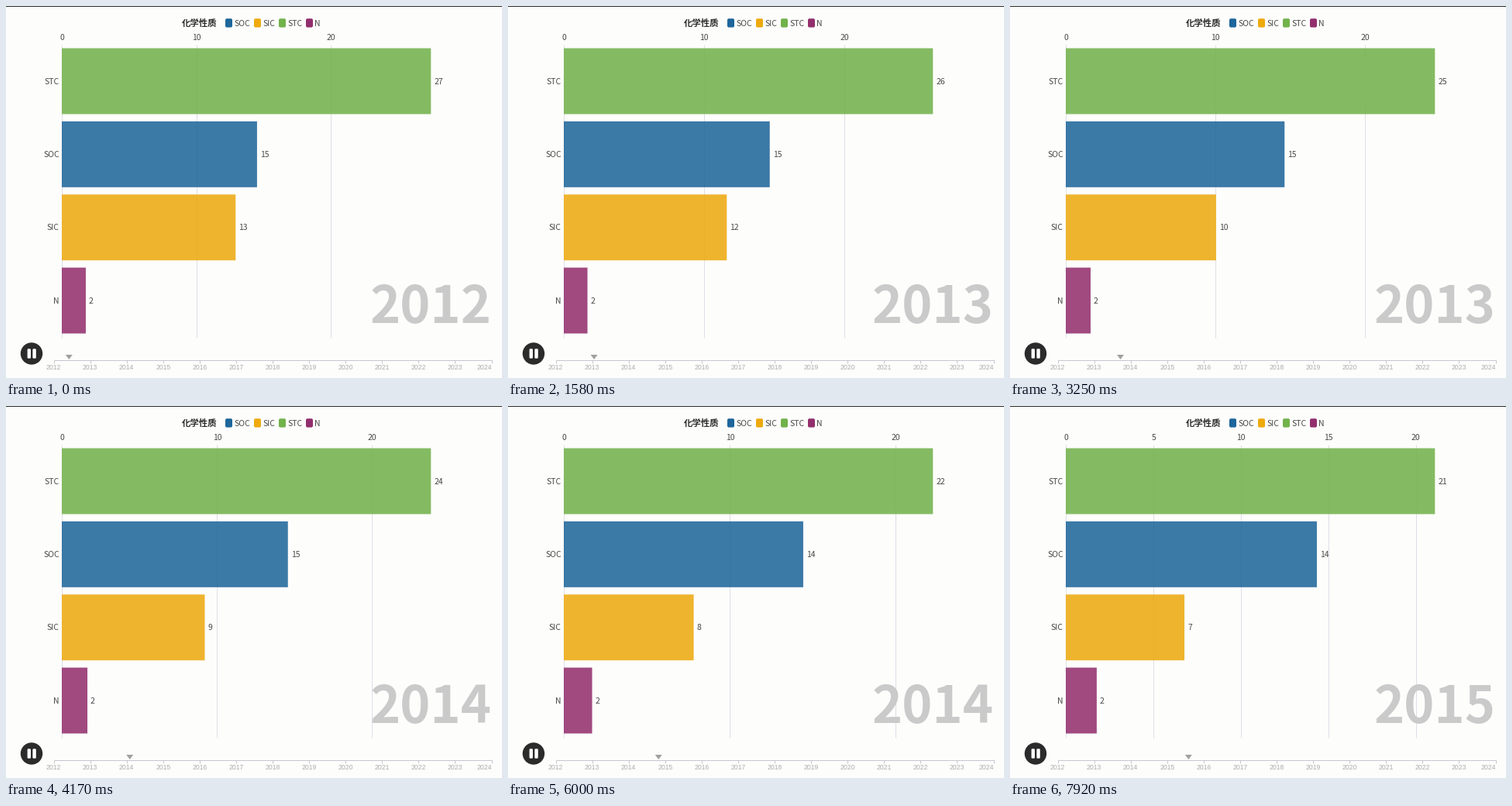
Animation of 640x480 px, one loop 8000 ms. Source, as a matplotlib script:

```python
import numpy as np
import matplotlib.pyplot as plt
from matplotlib.animation import FuncAnimation
from matplotlib.patches import Circle, FancyBboxPatch, Polygon, Rectangle

W, H, DPI = 640, 480, 100
LOOP, INTERVAL, FPS = 8000, 40, 12
PX = 72 / DPI                      # points per pixel

SANS, ARIAL = "Noto Sans CJK JP", "Liberation Sans"
BG, INK, TEXT = "#fdfdfc", "#2b2b2b", "#484848"
GRID, AXIS, PALE = "#dedee6", "#c6c6d0", "#aeaeae"

X0, BAR_MAX = 72, 476.3            # bar origin and longest bar
TOP, PITCH, BAR_H = 54.5, 94.35, 85
LINE_X0, LINE_X1, LINE_Y = 61.5, 626.5, 456.5
FIRST, LAST = 2012, 2024
YEAR_W = (LINE_X1 - LINE_X0) / (LAST - FIRST)

COLORS = {"SOC": "#1e669b", "SIC": "#eeaa0f", "STC": "#72b24b", "N": "#922f6d"}

# values at the start of 2012..2016
SERIES = {
    "STC": [28.13, 26.47, 23.99, 21.86, 20.56],
    "SOC": [14.37, 14.70, 14.60, 14.39, 14.32],
    "SIC": [13.76, 11.755, 9.385, 7.485, 6.285],
    "N": [1.85, 1.69, 1.645, 1.72, 1.80],
}
LEGEND_X = {"SOC": 283, "SIC": 320, "STC": 352, "N": 387}

fig = plt.figure(figsize=(W / DPI, H / DPI), dpi=DPI, facecolor=BG)
ax = fig.add_axes([0, 0, 1, 1])
ax.set_xlim(0, W)
ax.set_ylim(H, 0)
ax.axis("off")


def text(x, y, s, size=10.4, color=TEXT, ha="left", font=SANS, **kw):
    return ax.text(x, y, s, fontsize=size * PX, color=color, ha=ha,
                   va="baseline", family=font, **kw)


def line(xs, ys, color, z=1):
    return ax.plot(xs, ys, color=color, lw=PX, zorder=z,
                   solid_capstyle="butt")[0]


def rounded(x, y, w, h, r, color, z=2):
    ax.add_patch(FancyBboxPatch(
        (x, y), w, h, boxstyle=f"round,pad=0,rounding_size={r}",
        fc=color, lw=0, zorder=z))


def draw_header():
    ax.add_patch(Rectangle((0, 0), W, 1, fc=INK, lw=0))
    text(227, 25.5, "化学性质", 11.4, INK, weight="bold")
    for name, x in LEGEND_X.items():
        rounded(x, 16.2, 9, 11.4, 2, COLORS[name])
        text(x + 11.2, 25.8, name)


def draw_timeline():
    line([LINE_X0, LINE_X1], [LINE_Y, LINE_Y], AXIS)
    for year in range(FIRST, LAST + 1):
        x = LINE_X0 + (year - FIRST) * YEAR_W
        line([x, x], [LINE_Y, LINE_Y + 4.5], AXIS)
        text(min(x, 617.3), 469.2, str(year), 8.6, PALE, "center", ARIAL)
    ax.add_patch(Circle((33, 448.5), 14.2, fc=INK, lw=0))
    for x in (27.6, 34.4):
        rounded(x, 442.3, 4.4, 12.4, 1.2, "white")


draw_header()
draw_timeline()

grid = [(line([0, 0], [50, 428], GRID), text(0, 43.9, "", ha="center"))
        for _ in range(6)]

bars = []
for i, (name, values) in enumerate(SERIES.items()):
    top = TOP + i * PITCH
    base = top + BAR_H / 2 + 3.6
    bar = Rectangle((X0, top), 0, BAR_H, fc=COLORS[name], lw=0, alpha=0.87,
                    snap=False, zorder=2)
    ax.add_patch(bar)
    text(68.7, base, name, ha="right")
    bars.append((bar, text(0, base, ""), values))

year_text = text(626.5, 408.6, "", 66.5, "#cacacb", "right", weight="bold")
marker = Polygon([(0, 0)] * 3, fc="#a0a0a0", lw=0, zorder=3)
ax.add_patch(marker)


def tick_step(top):
    """Round step giving about three ticks."""
    return 10 if top / 3 >= np.sqrt(50) else 5


def update(frame):
    tick = int((frame * INTERVAL + 30) * FPS / 1000)
    pos = 0.42 + 0.4 * tick / FPS          # years since the first one
    now = [np.interp(pos, range(5), values) for _, _, values in bars]
    top = max(now)
    scale = BAR_MAX / top

    for (bar, label, _), value in zip(bars, now):
        bar.set_width(value * scale)
        label.set_x(X0 + value * scale + 4)
        label.set_text(f"{value:.0f}")

    step = tick_step(top)
    for i, (rule, label) in enumerate(grid):
        value = i * step
        x = X0 + value * scale
        rule.set_xdata([x, x])
        label.set_x(x + 0.3)
        label.set_text(str(value))
        rule.set_visible(value <= top)
        label.set_visible(value <= top)

    year_text.set_text(str(FIRST + int(pos)))
    x = LINE_X0 + pos * YEAR_W
    marker.set_xy([(x - 4.5, 450), (x + 4.5, 450), (x, 456)])
    return []


anim = FuncAnimation(fig, update, frames=LOOP // INTERVAL, interval=INTERVAL,
                     init_func=lambda: update(0), repeat=True, repeat_delay=0)
plt.show()
```
